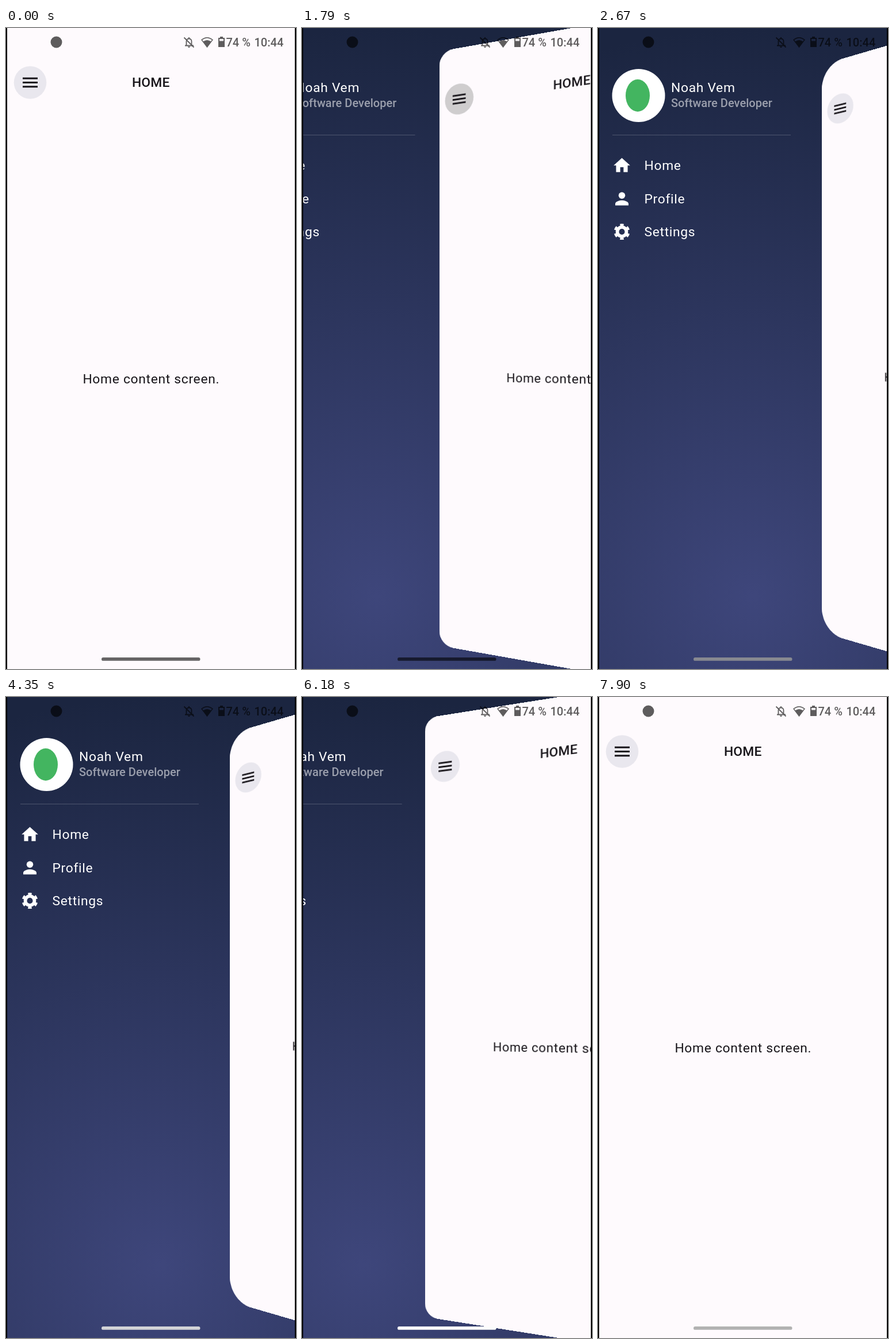
Animation, 504 px wide and 1111 px high, one loop 8000 ms. Source, as an HTML page:

```html
<!DOCTYPE html>
<html lang="en">
<head>
<meta charset="utf-8">
<title>Drawer menu</title>
<style>
  html, body { margin: 0; width: 100%; height: 100%; overflow: hidden; background: #000; }
  #stage { position: absolute; left: 0; top: 0; width: 504px; height: 1111px; overflow: hidden;
    background: radial-gradient(circle 985px at var(--glow) 985px, #3e467b, #1b2540); }
  #stage svg { position: absolute; left: 0; top: 0; overflow: visible; }
  #panel { position: absolute; left: 2px; top: 0; width: 500px; height: 1111px;
    background: #fefafd; overflow: hidden; }
  #bezel { position: absolute; inset: 0; border: solid #000; border-width: 0 2px; }
  text { font: 400 22.8px Roboto, sans-serif; letter-spacing: .7px; }
  .title { font-weight: 500; letter-spacing: .2px; }
  .role { font-size: 20px; font-weight: 500; letter-spacing: .04px; opacity: .55; }
  .status { font-size: 20px; font-weight: 500; letter-spacing: 0; }
</style>
</head>
<body>
<div id="stage">
  <svg id="drawer" width="504" height="1111" fill="#fff">
    <circle cx="70.5" cy="117" r="46"/>
    <ellipse cx="69" cy="117" rx="21" ry="28" fill="#43b560"/>
    <text x="127" y="111">Noah Vem</text>
    <text class="role" x="127" y="137">Software Developer</text>
    <path d="M25 185.5H335" stroke="#fff" stroke-opacity=".2"/>
    <g transform="translate(24.25 221) scale(1.4375)">
      <path d="M10 20v-6h4v6h5v-8h3L12 3 2 12h3v8z"/>
    </g>
    <g transform="translate(24.25 278.7) scale(1.4375)">
      <circle cx="12" cy="8" r="4"/>
      <path d="M12 14c-2.67 0-8 1.34-8 4v2h16v-2c0-2.66-5.33-4-8-4z"/>
    </g>
    <g transform="translate(24.25 335.9) scale(1.4375)" fill="none" stroke="#fff">
      <circle cx="12" cy="12" r="5.5" stroke-width="4"/>
      <circle cx="12" cy="12" r="8.3" stroke-width="2.8" pathLength="60" stroke-dasharray="5 5" stroke-dashoffset="-2.5"/>
    </g>
    <text x="80.5" y="246">Home</text>
    <text x="80.5" y="304">Profile</text>
    <text x="80.5" y="361">Settings</text>
  </svg>

  <div id="panel">
    <svg width="500" height="1111" fill="#171419">
      <circle cx="40" cy="94.5" r="28.3" fill="#e9e7ee"/>
      <circle id="ripple" cx="40" cy="94.5" r="28.3" fill="#cfcdce"/>
      <path d="M27 87.3h26M27 94.5h26M27 101.7h26" stroke="#171419" stroke-width="2.9"/>
      <text class="title" x="249.7" y="102" text-anchor="middle">HOME</text>
      <text x="250.3" y="616" text-anchor="middle">Home content screen.</text>
    </svg>
  </div>

  <svg width="504" height="1111">
    <g opacity=".63">
      <circle cx="87.5" cy="24.5" r="10"/>
      <path d="M311 30.5h15M313.5 30v-7c0-6 9-6 9 0v7M318 18v-2" fill="none" stroke="#000" stroke-width="1.8"/>
      <path d="M316 32h4a2 2 0 0 1-4 0z"/>
      <path d="M309.5 16.5l17 17" stroke="#000" stroke-width="1.8"/>
      <path d="M340 20.5q9.5-7.5 19 0L349.5 33z" fill="none" stroke="#000" stroke-width="1.5"/>
      <path d="M342.5 23.5q7-5 14 0L349.5 33z"/>
      <path d="M369 17h3v-2h5v2h3v16h-11zM371 19v3.5h7V19z" fill-rule="evenodd"/>
      <text class="status" x="382.5" y="32">74 %</text>
      <text class="status" x="431.5" y="32">10:44</text>
    </g>
    <rect id="handle" x="166" y="1091" width="171.5" height="5.8" rx="2.9"/>
  </svg>
  <div id="bezel"></div>
</div>
<script>
const LOOP = 8000, DRAWER_WIDTH = 355.4, TILT = -10, CAMERA = 337, RADIUS = 46;
const TWEEN_STEPS = 15.06, GLOW_X = 268;
const [stage, drawer, panel, ripple, handle] =
  ['stage', 'drawer', 'panel', 'ripple', 'handle'].map(id => document.getElementById(id));
const clamp = x => Math.max(0, Math.min(1, x));

// Playback cadence: three steps 20 ms apart, the third held for 100 ms.
function stepsSince(t, origin) {
  const group = Math.floor((t - origin) / 140);
  const rest = t - origin - group * 140;
  return 3 * group + Math.min(2, Math.floor(rest / 20));
}

// cubic-bezier(.4, 0, .2, 1)
function ease(x) {
  let lo = 0, hi = 1;
  for (let i = 0; i < 24; i++) {
    const s = (lo + hi) / 2, r = 1 - s;
    if (1.2 * r * r * s + .6 * r * s * s + s * s * s < x) lo = s; else hi = s;
  }
  return lo * lo * (3 - 2 * lo);
}

function openness(t) {
  if (t < 6010) return ease(clamp((stepsSince(t, 1230) - 6) / TWEEN_STEPS));
  return 1 - ease(clamp((stepsSince(t, 6040) + 2) / TWEEN_STEPS));
}

// time, grey level, opacity
const handleKeys = [
  [0, 0, .6], [2070, 0, .6], [2670, 150, .85], [4350, 222, .94],
  [5800, 252, 1], [6620, 252, 1], [7900, 178, 1], [LOOP, 176, 1]
];

function handleColor(t) {
  const i = handleKeys.findIndex(key => key[0] > t);
  const a = handleKeys[i - 1], b = handleKeys[i];
  const f = (t - a[0]) / (b[0] - a[0]);
  const [grey, alpha] = [1, 2].map(k => a[k] + (b[k] - a[k]) * f);
  return `rgba(${grey},${grey},${grey},${alpha})`;
}

function draw(now) {
  const t = now % LOOP;
  const p = openness(t);
  const step = stepsSince(t, 1230);
  const drawerX = DRAWER_WIDTH * (p - 1);
  stage.style.setProperty('--glow', GLOW_X + drawerX + 'px');
  drawer.style.transform = `translateX(${drawerX}px)`;
  panel.style.transform =
    `translateX(${DRAWER_WIDTH * p}px) perspective(${CAMERA}px) rotateY(${TILT * p}deg)`;
  panel.style.borderRadius = RADIUS * p + 'px';
  ripple.style.opacity = Math.min(clamp(step / 3), clamp((17 - step) / 4));
  handle.style.fill = handleColor(t);
}

const start = performance.now();
function tick() {
  draw(performance.now() - start);
  requestAnimationFrame(tick);
}
tick();
</script>
</body>
</html>
```
